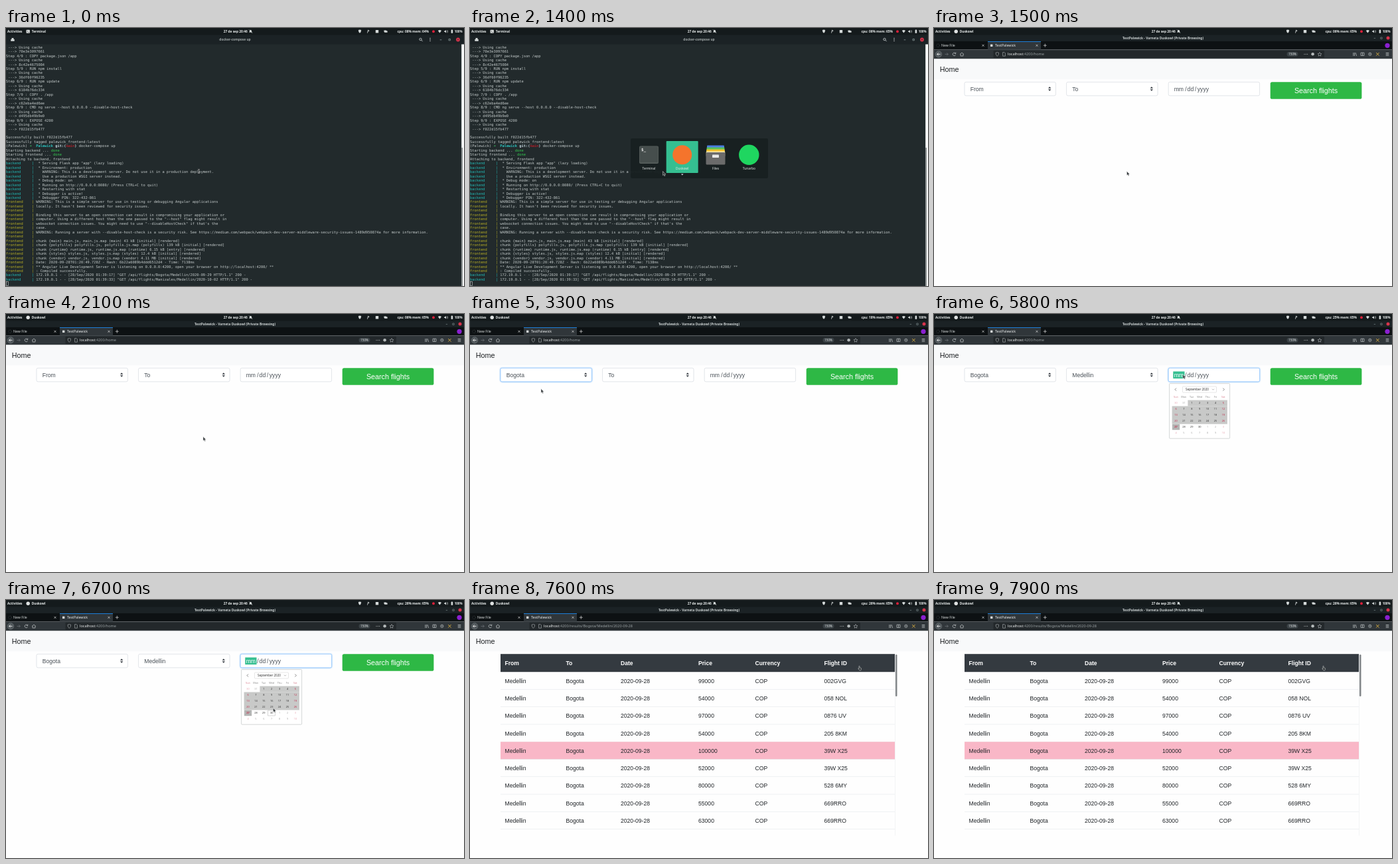
Recreate the animation shown at these times as an HTML page. Size 690 px wide and 388 px high, loop 8 s.

```html
<!DOCTYPE html>
<html lang="en">
<head>
<meta charset="utf-8">
<title>Flight search demo</title>
<style>
html, body { margin: 0; width: 100%; height: 100%; overflow: hidden; background: #222a2c; }
svg { display: block; width: 690px; height: 388px; }
text { white-space: pre; font-family: "Noto Sans", sans-serif; }
.mono { font-family: "DejaVu Sans Mono", monospace; }
.arial { font-family: "Liberation Sans", Arial, sans-serif; }
.bold { font-weight: 700; }
.mid { text-anchor: middle; }
</style>
</head>
<body>
<svg id="stage" viewBox="0 0 690 388" xmlns="http://www.w3.org/2000/svg"></svg>
<script>
const LOOP = 8000, ACCENT = '#35bf91', PALE = '#d5dada';
const $ = id => document.getElementById(id);

// y is the vertical middle of the capitals
const text = (x, y, s, size, fill, cls = '', attr = '') =>
  `<text x="${x}" y="${(y + size * 0.36).toFixed(2)}" font-size="${size}" fill="${fill}" class="${cls}" ${attr}>${s}</text>`;
const rect = (x, y, w, h, fill, attr = '') =>
  `<rect x="${x}" y="${y}" width="${w}" height="${h}" fill="${fill}" ${attr}/>`;
const dot = (x, y, r, fill, attr = '') => `<circle cx="${x}" cy="${y}" r="${r}" fill="${fill}" ${attr}/>`;
const line = (d, color = PALE, w = 0.7) => `<path d="${d}" fill="none" stroke="${color}" stroke-width="${w}"/>`;
const shape = (d, fill, attr = '') => `<path d="${d}" fill="${fill}" ${attr}/>`;
const group = (id, body, attr = '') => `<g id="${id}" ${attr}>${body}</g>`;
const span = (s, fill, bold) => `<tspan fill="${fill}"${bold ? ' class="bold"' : ''}>${s}</tspan>`;

// ---------- terminal ----------
const step = (n, cmd, hash) => `Step ${n}/9 : ${cmd}\n ---> Using cache\n ---> ${hash}\n`;
const back = s => s.split('\n').map(l => 'backend     | ' + l).join('\n') + '\n';
const front = s => s.split('\n').map(l => 'frontend    | ' + l).join('\n') + '\n';
const log = ' ---> Using cache\n ---> 70e3e3097661\n' +
  step(4, 'COPY package.json /app', '8c42e4675084') +
  step(5, 'RUN npm install', '36df60f96235') +
  step(6, 'RUN npm update', '6184b76dc334') +
  step(7, 'COPY . /app', 'c62eba4ed6ee') +
  step(8, 'CMD ng serve --host 0.0.0.0 --disable-host-check', 'd495db49b9e0') +
  step(9, 'EXPOSE 4200', 'f022d15fb477') +
  `
Successfully built f022d15fb477
Successfully tagged palewick_frontend:latest
PROMPT
Starting backend ... done
Starting frontend ... done
Attaching to backend, frontend
` + back(` * Serving Flask app "app" (lazy loading)
 * Environment: production
   WARNING: This is a development server. Do not use it in a production deployment.
   Use a production WSGI server instead.
 * Debug mode: on
 * Running on http://0.0.0.0:8080/ (Press CTRL+C to quit)
 * Restarting with stat
 * Debugger is active!
 * Debugger PIN: 322-432-861`) + front(`WARNING: This is a simple server for use in testing or debugging Angular applications
locally. It hasn't been reviewed for security issues.

Binding this server to an open connection can result in compromising your application or
computer. Using a different host than the one passed to the "--host" flag might result in
websocket connection issues. You might need to use "--disableHostCheck" if that's the
case.
WARNING: Running a server with --disable-host-check is a security risk. See https://medium.com/webpack/webpack-dev-server-middleware-security-issues-1489d950874a for more information.

chunk {main} main.js, main.js.map (main) 43 kB [initial] [rendered]
chunk {polyfills} polyfills.js, polyfills.js.map (polyfills) 139 kB [initial] [rendered]
chunk {runtime} runtime.js, runtime.js.map (runtime) 6.15 kB [entry] [rendered]
chunk {styles} styles.js, styles.js.map (styles) 12.4 kB [initial] [rendered]
chunk {vendor} vendor.js, vendor.js.map (vendor) 4.11 MB [initial] [rendered]
Date: 2020-09-28T01:20:49.728Z - Hash: 6b22a6089b4ddd6512d4 - Time: 7138ms
** Angular Live Development Server is listening on 0.0.0.0:4200, open your browser on http://localhost:4200/ **
: Compiled successfully.`) + back(`172.19.0.1 - - [28/Sep/2020 01:39:17] "GET /api/flights/Bogota/Medellin/2020-09-29 HTTP/1.1" 200 -
172.19.0.1 - - [28/Sep/2020 01:39:33] "GET /api/flights/Manizales/Medellin/2020-10-02 HTTP/1.1" 200 -`);

const prompt = '(Palewick) ' + span('➜', '#3fd06a', true) + '  ' + span('Palewick', '#2cc4c0', true) + ' ' +
  span('git:(', '#c3d4dc', true) + span('main', '#a8202a', true) + span(')', '#c3d4dc', true) + ' docker-compose up';
const paint = l => l === 'PROMPT' ? prompt : l
  .replace(/^backend +\|/, m => span(m, '#22b8b4'))
  .replace(/^frontend +\|/, m => span(m, '#b9b025'))
  .replace(/done$/, m => span(m, '#35c850'));

const terminal = rect(0, 10, 690, 378, '#222a2c') + rect(0, 10, 690, 14.5, '#1b2225') +
  text(345, 17.5, 'docker-compose up', 4.85, '#a0a7a7', 'bold mid') +
  shape('M7.3 17h1.2v-2h3v2h1.2v2.8H7.3z', PALE) +
  dot(624.5, 17, 1.7, 'none', `stroke="${PALE}" stroke-width=".8"`) + line('M625.8 18.3l1.8 1.8', PALE, 0.9) +
  [15.4, 17.5, 19.6].map(y => dot(639, y, 0.7, PALE)).join('') +
  line('M653.7 17.8h2.6M667 16.4h2.4v2.4h-2.4z', '#9aa') +
  dot(681, 17.5, 2.9, '#d8344c') + line('M680 16.5l2 2m0-2l-2 2', '#222', 0.6) +
  log.split('\n').map((l, i) => text(0, 28.7 + i * 6.468, paint(l), 5.369, '#c3caca', 'mono')).join('') +
  rect(0.4, 381.4, 2.9, 6, 'none', 'id="caret" stroke="#c3caca" stroke-width=".6"') +
  rect(686.2, 24.5, 3.8, 363.5, '#fbfcfc') + rect(686.2, 180, 1.9, 208, '#858c8c');

const apps = [['Terminal', 269.5], ['Duskowl', 319.7], ['Files', 370], ['Tunarbo', 420.3]];
const switcher = rect(242, 166, 207, 60, '#182022', 'rx="2" opacity=".97"') +
  rect(295.7, 169.9, 48, 48.2, ACCENT, 'rx="1"') +
  rect(255, 177.5, 29, 26.5, '#59615f', 'rx="2"') + rect(255.6, 178.2, 27.8, 24.4, '#464e4d', 'rx="1.5"') +
  text(258, 183, '$_', 6, '#eee', 'mono bold') +
  dot(319.7, 190.7, 14.5, '#f5742c') +
  ['#4a7de0', '#5ac05a', '#f2c230', '#f6e7b0'].map((c, i) => rect(357 - i * 0.4, 176.5 + i * 3, 26 + i * 0.8, 8, c, 'rx="1"')).join('') +
  rect(355.5, 187, 29, 18.5, '#6b6b6b', 'rx="1.5"') + rect(365, 190.5, 10, 4.5, '#e8e8e8', 'rx=".8"') +
  dot(420.3, 190.7, 15.2, '#1fd660') +
  apps.map(([s, x]) => text(x, 211.5, s, 4.85, '#e4e8e8', 'mid')).join('') +
  shape('M318 219.4h3.6l-1.8 2z', '#dde');

// ---------- browser ----------
const grey = '#b4b9ba';
const chrome = rect(0, 10, 690, 378, '#fefefe') + rect(0, 10, 690, 10, '#1b2225') +
  text(345, 15.2, 'TestPalewick - Varneta Duskowl (Private Browsing)', 4.85, '#ccd2d2', 'bold mid') +
  line('M662.7 15.4h2.4M672.8 14h2.4v2.4h-2.4z', '#899', 0.6) + dot(684, 15, 2.5, '#d8344c') +
  rect(0, 20, 690, 12.5, '#0d1113') + rect(81, 20, 80, 12.5, '#30363a') + rect(81, 20, 80, 0.9, '#1a86e8') +
  dot(6, 26.3, 2.3, 'none', 'stroke="#555c5e" stroke-width=".6" stroke-dasharray="1 1"') +
  text(11, 26.3, 'New File', 5.25, '#d5d9d9') + rect(85, 24.6, 3.4, 3.4, '#d8dcdc') +
  text(92, 26.3, 'TestPalewick', 5.25, '#f0f2f2') +
  [74, 155].map(x => line(`M${x - 1.5} 24.8l3 3m0-3l-3 3`, '#ddd')).join('') +
  line('M164.8 26.2h5M167.3 23.7v5', '#ddd') + dot(683, 26.3, 3.6, '#8a1fd0') +
  rect(0, 32.5, 690, 14, '#30363a') + rect(89.5, 33.8, 498.5, 11, '#23282b', 'rx="1"') +
  dot(7, 39.4, 4.8, '#50575b', 'stroke="#777e80" stroke-width=".5"') + line('M9.5 39.4H4.7m2-2l-2 2 2 2', '#eee', 0.9) +
  line('M16.5 39.4h4.8m-2-2l2 2-2 2', '#6b7275', 0.8) +
  line('M32.6 40.3a2.3 2.3 0 1 1-.4-2.4M32.8 36.6v1.9h-2', grey, 0.8) +
  line('M39 39.6l3-2.6 3 2.6M40 39v3h4v-3', grey, 0.8) +
  line('M93 37.2l2.3-.7 2.3.7q0 4-2.3 5.2q-2.3-1.2-2.3-5.2zM103.6 36.6h2.6l1.2 1.2v4.4h-3.8z', grey, 0.6) +
  `<text x="111" y="41.4" font-size="5.57" fill="#989fa1"><tspan fill="#eef0f0">localhost</tspan>:4200/<tspan id="path"></tspan></text>` +
  rect(531.5, 35.8, 17, 7, '#3a4145', 'rx="3.5"') + text(540, 39.3, '150%', 4.6, '#e4e8e8', 'mid') +
  [558, 560.3, 562.6].map(x => dot(x, 39.3, 0.6, grey)).join('') + dot(570.6, 39.3, 2.3, grey) +
  line('M581 36.5l.9 2 2.1.2-1.6 1.4.5 2.1-1.9-1.1-1.9 1.1.5-2.1-1.6-1.4 2.1-.2z', grey, 0.6) +
  line('M631.8 37v5M633.6 37v5M635 37l1.6 5M643 37.2h5v4.2h-5zM645.5 37.2v4.2', grey, 0.8) +
  dot(656.8, 39.3, 2.1, 'none', `stroke="${grey}" stroke-width=".8"`) + dot(656.8, 39.3, 0.7, grey) +
  line('M666.2 37l4.4 4.6M670.6 37l-4.4 4.6', '#d0a840', 1) +
  line('M680.7 37.5h4.6M680.7 39.4h4.6M680.7 41.3h4.6', PALE, 0.7) +
  rect(0, 46.5, 690, 30.8, '#f8f9fa') + text(8.7, 62, 'Home', 10.78, '#1c1f22', 'arial');

const field = (id, x) => rect(x, 81.3, 137.4, 20.5, '#fff', `id="${id}" rx="2.2" stroke="#ced4da" stroke-width=".6"`);
const arrows = x => shape(`M${x} 90.8l2.2-2.5 2.2 2.5zM${x} 92.2l2.2 2.5 2.2-2.5z`, '#343a40');
const cities = ['Medellin', 'Bogota', 'Manizales'];

const dropdown = rect(199.3, 101.6, 137.2, 50.2, '#fff', 'stroke="#8e9494" stroke-width=".6"') +
  rect(199.6, 102, 136.6, 16.5, ACCENT, 'id="hl"') +
  cities.map((c, i) => text(203.5, 110.2 + i * 16.5, c, 8.6, '#333', '', `id="city${i}"`)).join('');

const dayX = i => 364.5 + (i % 7) * 11.9, dayY = i => 134 + Math.floor(i / 7) * 9;
const days = Array.from({ length: 42 }, (_, i) => {
  const d = new Date(2020, 7, 30 + i), weekend = i % 7 === 0 || i % 7 === 6;
  const fill = d.getMonth() === 8 ? (weekend ? '#c02848' : '#333') : (weekend ? '#e7a6b2' : '#aaa');
  return text(dayX(i), dayY(i), d.getDate(), 3.9, fill, i === 28 ? 'mid bold' : 'mid');
}).join('');
const calendar = rect(354.6, 104.6, 91, 82.6, '#fff', 'rx="1" stroke="#b8bcbc" stroke-width=".6"') +
  line('M365 111.5l-2 2 2 2M435.4 111.5l2 2-2 2', '#555', 0.7) +
  rect(374.5, 109, 51, 9, '#fff', 'rx="1" stroke="#ccc" stroke-width=".5"') +
  text(379, 113.5, 'September 2020', 4.5, '#333') + line('M419 112.7l1.5 1.5 1.5-1.5', '#666', 0.5) +
  ['Sun', 'Mon', 'Tue', 'Wed', 'Thu', 'Fri', 'Sat'].map((s, i) =>
    text(dayX(i), 125, s, 3.8, i % 6 ? '#8a8a8a' : '#d88090', 'mid')).join('') +
  rect(382.4, 129.5, 59.5, 9, '#c8c9c8') + rect(358.6, 138.5, 83.3, 27, '#c8c9c8') +
  rect(359.2, 166, 10.7, 8, '#b5b6b5', 'stroke="#999" stroke-width=".4"') +
  rect(0, 0, 10.9, 8, 'none', 'id="hover" stroke="#aaa" stroke-width=".5"') + days;

const form = field('from', 46) + field('to', 199.6) + field('date', 353.2) + arrows(172) + arrows(325.6) +
  text(54.7, 91.7, 'From', 8.625, '#495057', 'arial', 'id="fromText"') +
  text(208.3, 91.7, 'To', 8.625, '#495057', 'arial', 'id="toText"') +
  rect(360.3, 86.4, 17.2, 10.6, ACCENT, 'id="mmBack"') +
  group('blank', text(361.7, 91.7, 'mm', 8.625, '#495057', 'arial', 'id="mm"') +
    [['/', 378.2], ['dd', 381.6], ['/', 393], ['yyyy', 396.8]].map(([s, x]) => text(x, 91.7, s, 8.625, '#495057', 'arial')).join('')) +
  text(361.7, 91.7, '09 / 28 / 2020', 8.625, '#495057', 'arial', 'id="picked"') +
  rect(506.7, 81.2, 137.7, 25.6, '#2eb845', 'id="button" rx="2.6"') +
  text(575.5, 94.2, 'Search flights', 10.78, '#fff', 'arial mid') +
  group('dropdown', dropdown) + group('calendar', calendar);

const cols = [52.5, 144.5, 227, 344, 429.5, 533.5];
const flights = [[99, '002GVG'], [54, '058 NOL'], [97, '0876 UV'], [54, '205 8KM'], [100, '39W X25'],
  [52, '39W X25'], [80, '528 6MY'], [55, '669RRO'], [63, '669RRO']];
const cells = (list, y, fill, cls) => list.map((s, i) => text(cols[i], y, s, 8.625, fill, cls)).join('');
const results = rect(46, 81.2, 594, 27, '#343a40') +
  cells(['From', 'To', 'Date', 'Price', 'Currency', 'Flight ID'], 94.8, '#fff', 'arial bold') +
  flights.map(([k, id], i) => {
    const y = 108.2 + i * 26.27;
    return (k === 100 ? rect(46, y, 594, 26.27, '#f9b7c7') : '') + rect(46, y + 26, 594, 0.5, '#dee2e6') +
      cells(['Medellin', 'Bogota', '2020-09-28', k + '000', 'COP', id], y + 13.4, '#212529', 'arial');
  }).join('') + rect(640, 81.2, 0.4, 273, '#e4e6e8') + rect(641, 82, 2.5, 63, '#83878a', 'rx="1.2"');

// ---------- top panel ----------
const panel = rect(0, 0, 690, 10.5, '#141a1c') + text(2, 5.2, 'Activities', 4.85, '#e8ecec', 'bold') +
  group('termIcon', rect(30.5, 2.7, 5.4, 5, '#d8dcdc', 'rx=".8"') + line('M31.6 4l1.2 1.1-1.2 1.1M33.3 6.5h1.5', '#222', 0.5)) +
  dot(33.2, 5.2, 2.7, '#dfe2e2', 'id="webIcon"') + text(38.7, 5.2, '', 4.85, '#e8ecec', 'bold', 'id="app"') +
  text(345.7, 5.2, '27 de sep 20:46', 4.85, '#e8ecec', 'bold mid') +
  shape('M366 6.6q1-.8 1-2.3q.2-1.5 1.5-1.5t1.5 1.5q0 1.5 1 2.3z', PALE) + line('M366 2.4l5 5.4', PALE, 0.6) +
  shape('M530.8 3l2.2-.6 2.2.6q0 3.6-2.2 4.8q-2.2-1.2-2.2-4.8z', PALE) +
  line('M544.5 7.6l1-4.6M545.6 3l1.6 1.2-2 1', PALE, 0.8) + rect(556.8, 3, 4.4, 4.4, PALE) +
  shape('M569.4 3.4h3.6v.8h1.6v2.6h-4q-1.2-.6-1.2-2z', PALE) +
  text(589.5, 5.2, '', 4.85, '#e8ecec', 'bold', 'id="load"') +
  dot(644, 5.2, 2, '#d8203a') + shape('M650.8 4q2.6-2.2 5.2 0l-2.6 3.6z', PALE) +
  shape('M660.3 4.3h1.2l1.5-1.4v4.6l-1.5-1.4h-1.2z', PALE) + line('M664 3.8q1 1.4 0 2.8M665 3q1.6 2.2 0 4.4', PALE, 0.5) +
  rect(670.6, 3, 2.6, 4.8, PALE, 'rx=".4"') + rect(671.3, 2.3, 1.2, 0.8, PALE) +
  text(675.7, 5.2, '100%', 4.5, '#e8ecec', 'bold');

const edge = 'stroke="#eee" stroke-width=".45" stroke-linejoin="round"';
const pointer = group('beam', line('M-1.2-3h2.4M-1.2 3h2.4M0-3v6', '#eee', 1.1) + line('M-1.2-3h2.4M-1.2 3h2.4M0-3v6', '#222', 0.5)) +
  shape('M0 0v6.1l1.4-1.2 1 2.2 1.1-.5-1-2.1h1.8z', '#33383a', `id="arrow" ${edge}`) +
  shape('M0 .4q.7-.8 1 .2v2.2l2.4.7q.6 2-.6 3.3h-2q-1.4-1.2-2-3l1.2.5z', '#33383a', `id="hand" ${edge}`);

$('stage').innerHTML = group('terminal', terminal) + group('switcher', switcher) +
  group('web', chrome + group('form', form) + group('results', results)) + group('panel', panel) + group('mouse', pointer);

// ---------- motion ----------
const mousePath = [[0, 290.5, 215.5], [1600, 290.5, 215.5], [2000, 297, 184.5], [2200, 297, 184.5], [2500, 110.5, 89],
  [2700, 110.5, 89], [3000, 107, 120], [3100, 107, 120], [3300, 107, 112.5], [3700, 175, 102], [3800, 175, 102],
  [4200, 246, 91], [4400, 246, 91], [4700, 243, 124], [4900, 244, 116], [5100, 245, 108], [5300, 245, 108],
  [5700, 375, 90], [5900, 375, 92], [6700, 402.5, 162.5], [7000, 376, 169], [7100, 376, 169], [7450, 586, 99], [8000, 586, 99]];

function mouseAt(t) {
  const i = mousePath.findIndex(p => p[0] > t);
  const [t0, x0, y0] = mousePath[i - 1], [t1, x1, y1] = mousePath[i];
  const u = (t - t0) / (t1 - t0), e = u * u * (3 - 2 * u);
  return [x0 + (x1 - x0) * e, y0 + (y1 - y0) * e];
}
const show = (id, on) => { $(id).style.display = on ? '' : 'none'; };
const put = (id, s) => { if ($(id).textContent !== s) $(id).textContent = s; };

function focus(id, on) {
  $(id).setAttribute('stroke', on ? '#80bdff' : '#ced4da');
  $(id).style.filter = on ? 'drop-shadow(0 0 1px #66aef5)' : '';
}

function draw(t) {
  const between = (a, b) => t >= a && t < b;
  const web = t >= 1500, done = t >= 7600, [x, y] = mouseAt(t);
  show('terminal', !web);
  show('switcher', between(1400, 1500));
  show('web', web);
  show('form', !done);
  show('results', done);
  show('termIcon', !web);
  show('webIcon', web);
  $('caret').setAttribute('fill', between(100, 1100) ? '#c3caca' : 'none');
  put('app', web ? 'Duskowl' : 'Terminal');
  put('load', t < 200 ? 'cpu: 08% mem: 64%' : `cpu: ${t < 2200 ? '06' : t < 4200 ? 18 : t < 6200 ? 25 : 26}% mem: 65%`);
  put('path', done ? 'results/Bogota/Medellin/2020-09-28' : 'home');

  const fromOpen = between(2700, 3200), toOpen = between(4400, 5300), picking = between(5800, 7100);
  focus('from', between(2700, 4400));
  focus('to', between(4400, 5800));
  focus('date', between(5800, 7600));
  put('fromText', t < 3200 ? 'From' : 'Bogota');
  put('toText', t < 5300 ? 'To' : 'Medellin');

  show('dropdown', fromOpen || toOpen);
  $('dropdown').setAttribute('transform', `translate(${fromOpen ? -153.6 : 0} 0)`);
  const pick = fromOpen ? (t < 2900 ? 0 : 1) : between(4600, 5000) ? 1 : 0;
  $('hl').setAttribute('y', 102 + pick * 16.5);
  cities.forEach((_, i) => $('city' + i).setAttribute('fill', i === pick ? '#fff' : '#333'));

  show('calendar', picking);
  show('mmBack', picking);
  $('mm').setAttribute('fill', picking ? '#fff' : '#495057');
  show('blank', t < 7100);
  show('picked', t >= 7100);
  const col = Math.floor((x - 358.55) / 11.9), row = Math.floor((y + 3.5 - 129.5) / 9);
  show('hover', row >= 4 && row < 6 && col >= 0 && col < 7);
  $('hover').setAttribute('x', dayX(col) - 5.45);
  $('hover').setAttribute('y', 130 + row * 9);

  const overButton = t > 7100 && x > 506;
  $('button').setAttribute('fill', overButton ? '#28a43d' : '#2eb845');
  show('beam', t < 1100);
  show('arrow', t >= 1100 && !overButton);
  show('hand', overButton);
  $('mouse').setAttribute('transform', `translate(${x.toFixed(2)} ${y.toFixed(2)})`);
}

const start = performance.now();
function tick() {
  draw((performance.now() - start) % LOOP);
  requestAnimationFrame(tick);
}
tick();
</script>
</body>
</html>
```
